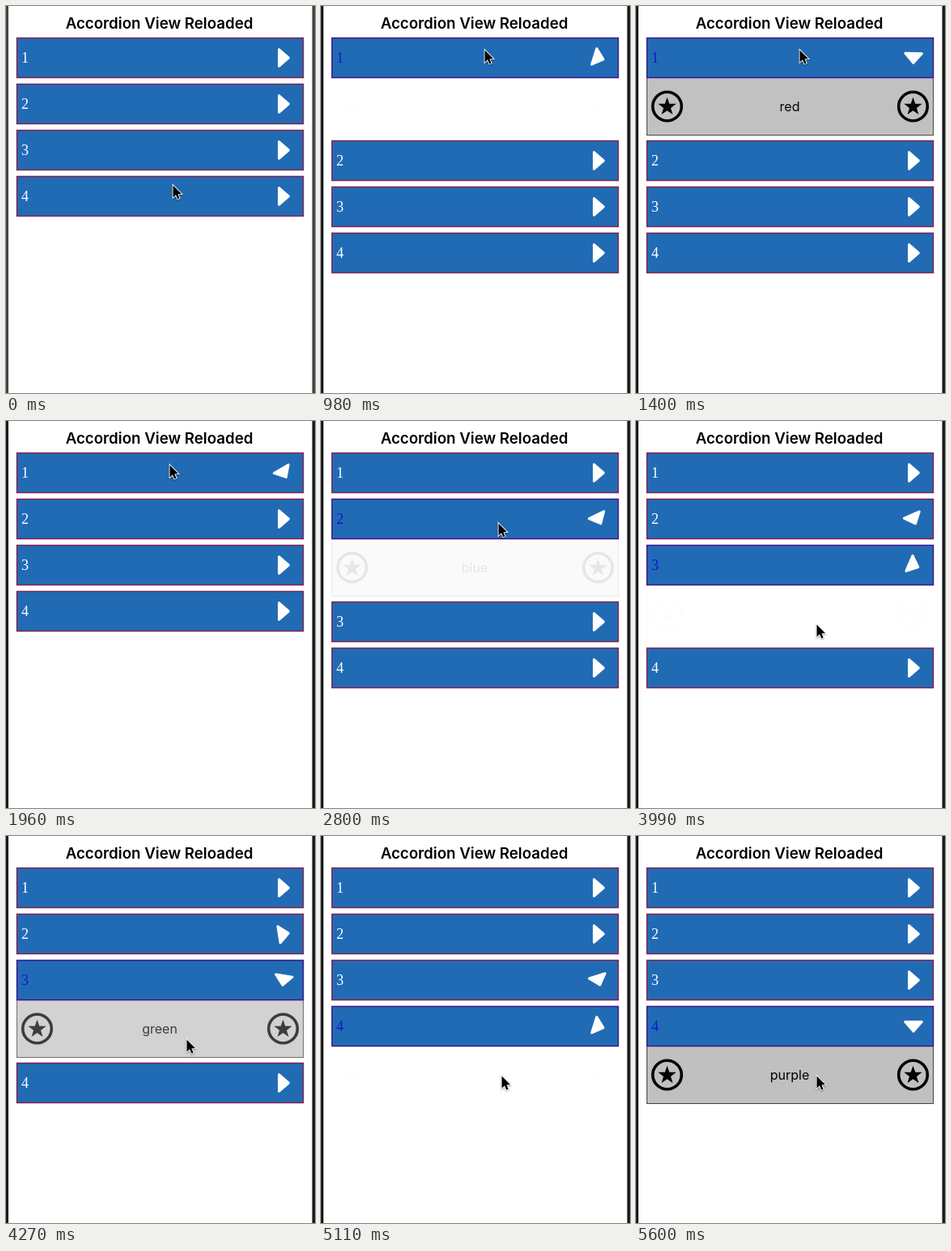
Animation of 382 by 478 pixels, one loop 5740 ms. Source, as an HTML page with a canvas:

```html
<!DOCTYPE html>
<html lang="en">
<head>
<meta charset="utf-8">
<title>Accordion View Reloaded</title>
<style>
  html, body { margin: 0; width: 100%; height: 100%; overflow: hidden; background: #fff; }
  canvas { display: block; }
</style>
</head>
<body>
<canvas id="stage" width="382" height="478"></canvas>
<script>
const ctx = document.getElementById('stage').getContext('2d');

const LOOP = 5740, STEP = 70, LAST = 5600, DURATION = 500;
const LEFT = 13, TOP = 39, WIDTH = 355, HEADER = 50, PITCH = 57, PANEL = 70;
const LABELS = ['red', 'blue', 'green', 'purple'];

// [time, open section], -1 means all closed
const TOGGLES = [[0, -1], [958, 0], [1920, -1], [2700, 1], [3960, 2], [5088, 3]];

// [time, x, y] of the pointer tip
const POINTER = [
  [50, 206, 221], [560, 202, 54], [2420, 202, 54], [2660, 219, 126], [3110, 219, 126],
  [3680, 223, 251], [4520, 223, 251], [5040, 223, 296]
];

const easeInOut = p => p < .5 ? 2 * p * p : 1 - 2 * (1 - p) ** 2;
const easeOutBack = p => 1 + 2.70158 * (p - 1) ** 3 + 1.70158 * (p - 1) ** 2;
const clamp = p => Math.min(1, Math.max(0, p));

function polygon(points) {
  ctx.beginPath();
  points.forEach(([x, y]) => ctx.lineTo(x, y));
  ctx.closePath();
}

function text(string, x, y, font, color, align) {
  ctx.font = font;
  ctx.fillStyle = color;
  ctx.textAlign = align;
  ctx.fillText(string, x, y);
}

function drawStar(x, y) {
  ctx.strokeStyle = ctx.fillStyle = '#000';
  ctx.lineWidth = 3.6;
  ctx.beginPath();
  ctx.arc(x, y, 17.8, 0, 2 * Math.PI);
  ctx.stroke();
  polygon(Array.from({ length: 10 }, (_, i) => {
    const angle = i * Math.PI / 5 - Math.PI / 2, radius = i % 2 ? 4.7 : 11.8;
    return [x + radius * Math.cos(angle), y + .5 + radius * Math.sin(angle)];
  }));
  ctx.fill();
}

function drawPanel(y, label, opacity) {
  ctx.globalAlpha = opacity;
  ctx.fillStyle = '#c0c0c0';
  ctx.fillRect(LEFT, y, WIDTH, PANEL + 1);
  ctx.strokeStyle = '#444';
  ctx.lineWidth = 1;
  ctx.strokeRect(LEFT + .5, y - .5, WIDTH - 1, PANEL + 1);
  drawStar(38.5, y + 35);
  drawStar(342.5, y + 35);
  text(label, 190, y + 40.5, '16px Inter, sans-serif', '#000', 'center');
  ctx.globalAlpha = 1;
}

function drawHeader(y, number, active, turn) {
  ctx.fillStyle = '#216bb5';
  ctx.fillRect(LEFT, y, WIDTH, HEADER);
  ctx.strokeStyle = active ? '#40148c' : '#802253';
  ctx.lineWidth = 1.5;
  ctx.strokeRect(LEFT + .5, y + .5, WIDTH - 1, HEADER - 1);
  text(number, 19, y + 31, '18px "Liberation Serif", serif', active ? '#1414d2' : '#fff', 'left');

  ctx.save();
  ctx.translate(343, y + 25);
  ctx.rotate(turn * Math.PI / 2);
  polygon([[-5.5, -10.3], [-5.5, 10.3], [6.3, 0]]);
  ctx.fillStyle = ctx.strokeStyle = '#fff';
  ctx.lineWidth = 3;
  ctx.lineJoin = 'round';
  ctx.fill();
  ctx.stroke();
  ctx.restore();
}

function drawPointer(t) {
  const next = POINTER.findIndex(key => key[0] > t);
  const to = POINTER.at(next), from = POINTER[Math.max(0, next - 1)];
  const [t0, x0, y0] = next < 0 ? to : from;
  const p = easeInOut(clamp((t - t0) / (to[0] - t0 || 1)));
  ctx.save();
  ctx.translate(x0 + (to[1] - x0) * p, y0 + (to[2] - y0) * p);
  polygon([[.5, .5], [.5, 15.5], [4, 12.3], [6.3, 17.4], [8.6, 16.4], [6.4, 11.4], [11, 11]]);
  ctx.lineJoin = 'miter';
  ctx.lineWidth = 1.8;
  ctx.strokeStyle = '#fff';
  ctx.shadowColor = 'rgba(0,0,0,.4)';
  ctx.shadowBlur = 2;
  ctx.shadowOffsetY = 1;
  ctx.stroke();
  ctx.shadowColor = 'transparent';
  ctx.fillStyle = '#000';
  ctx.fill();
  ctx.restore();
}

function draw(t) {
  ctx.fillStyle = '#fff';
  ctx.fillRect(0, 0, 382, 478);
  ctx.fillStyle = t < 840 ? '#444446' : '#1b1b1c';
  ctx.fillRect(0, 0, 3, 478);
  ctx.fillRect(378.5, 0, 4, 478);
  text('Accordion View Reloaded', 189.5, 27.5, '600 18.7px Inter, sans-serif', '#000', 'center');

  const current = TOGGLES.findLastIndex(toggle => toggle[0] <= t);
  const [start, open] = TOGGLES[current];
  const previous = current ? TOGGLES[current - 1][1] : -1;
  const p = clamp((t - start) / DURATION);

  let y = TOP;
  LABELS.forEach((label, i) => {
    const active = i === open;
    const turn = active ? easeOutBack(p) : i === previous ? 1 - easeOutBack(p) : 0;
    if (active) drawPanel(y + HEADER, label, easeInOut(p));
    drawHeader(y, i + 1, active, turn);
    y += PITCH + (active ? PANEL : 0);
  });
  drawPointer(t);
}

function tick() {
  const t = performance.now() % LOOP;
  draw(Math.min(LAST, Math.floor(t / STEP) * STEP));
  requestAnimationFrame(tick);
}
tick();
</script>
</body>
</html>
```
